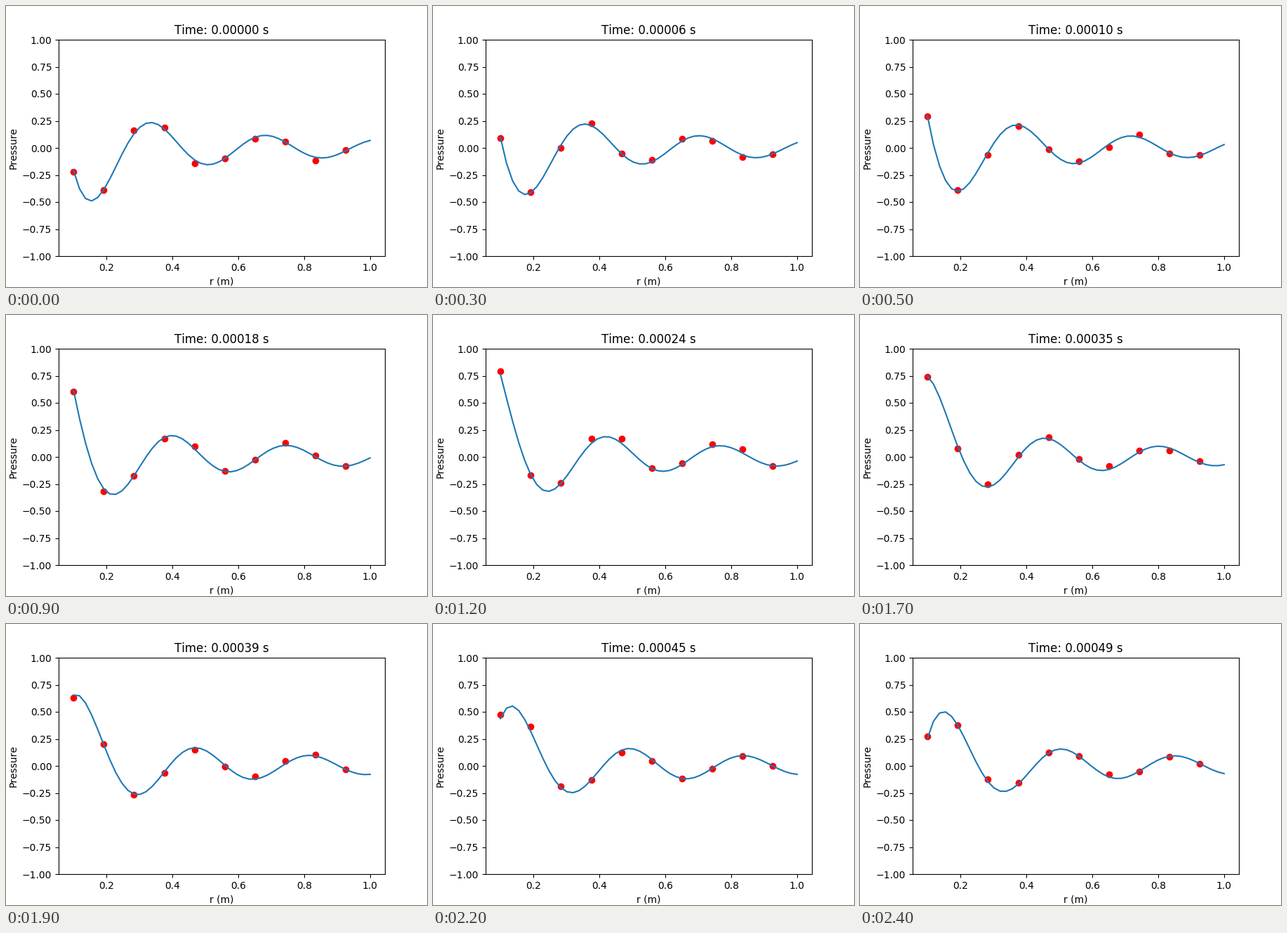
Recreate the animation shown at these times as a matplotlib script. Size 600 by 400 pixels, loop 2.5 s.

```python
import numpy as np
import matplotlib.pyplot as plt
from matplotlib.animation import FuncAnimation

plt.rcParams["text.kerning_factor"] = 6

FRAMES, INTERVAL = 25, 100
SPEED, FREQ = 343.0, 1000.0
OMEGA = 2 * np.pi * FREQ
K = OMEGA / SPEED

r = np.linspace(0.1, 1.0, 50)
times = np.linspace(0, 1 / FREQ, 50)[:FRAMES]
sensors = r[::5]
noise = np.random.default_rng(4).normal(0, 0.02, (FRAMES, sensors.size))


def pressure(dist, t):
    """Outgoing spherical wave from a point source."""
    return np.cos(K * dist - OMEGA * t) / (4 * np.pi * dist)


fig, ax = plt.subplots(figsize=(6, 4), dpi=100)
line, = ax.plot(r, pressure(r, 0))
dots = ax.scatter(sensors, pressure(sensors, 0), color="red")
ax.set_xlim(0.055, 1.045)
ax.set_ylim(-1, 1)
ax.set_xlabel("r (m)")
ax.set_ylabel("Pressure")
title = ax.set_title("")


def update(i):
    t = times[i]
    line.set_ydata(pressure(r, t))
    dots.set_offsets(np.column_stack([sensors, pressure(sensors, t) + noise[i]]))
    title.set_text(f"Time: {t:.5f} s")
    return line, dots, title


anim = FuncAnimation(fig, update, frames=FRAMES, interval=INTERVAL, repeat=True)
plt.show()
```
